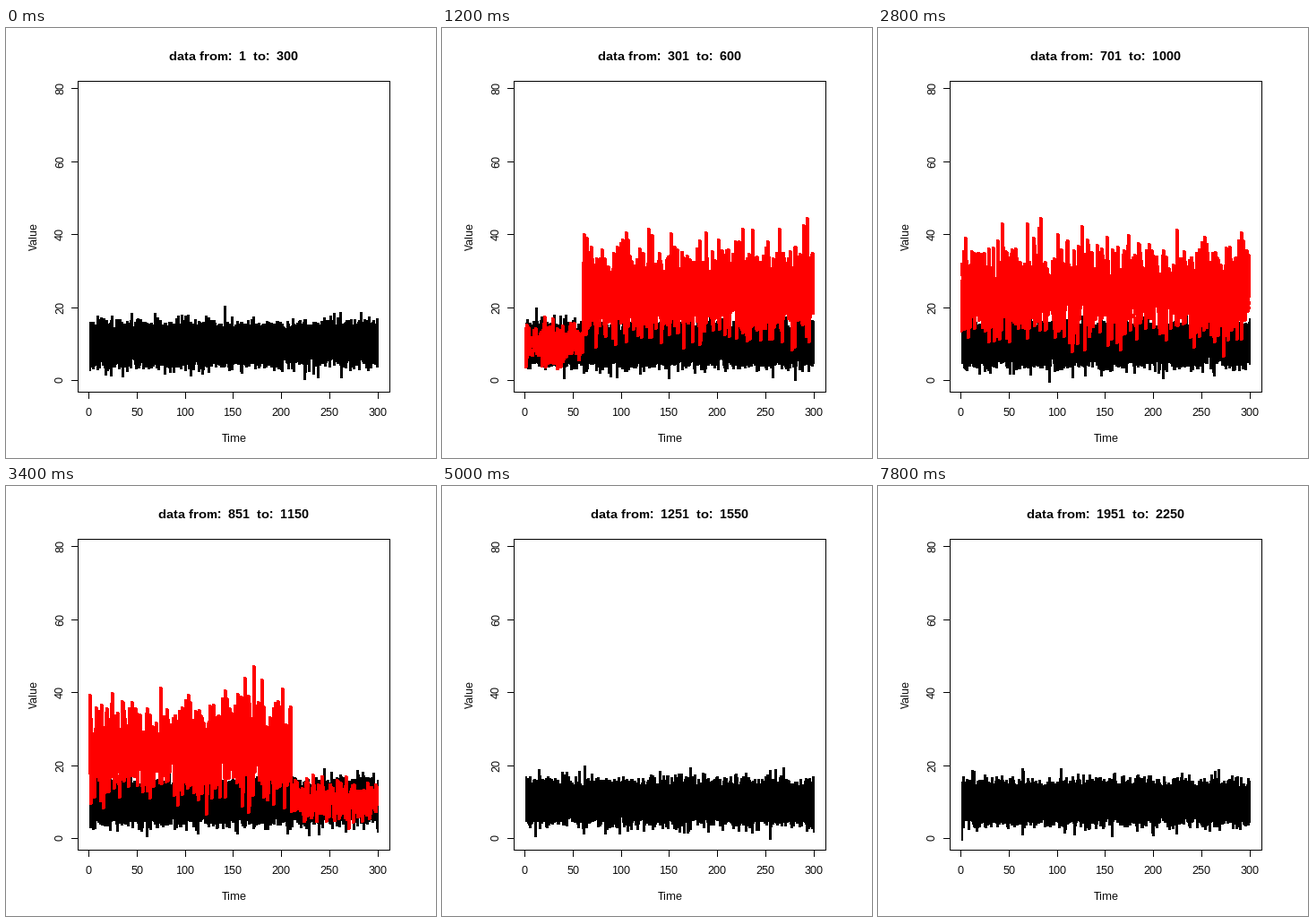
Write a matplotlib script that moves like this. It is 480x480 px and loops after 8 s.

```python
import numpy as np
import matplotlib.pyplot as plt
from matplotlib.animation import FuncAnimation
from matplotlib.collections import LineCollection

plt.rcParams.update({
    "font.family": "Liberation Sans",
    "text.hinting": "native",
    "text.hinting_factor": 1,
    "path.simplify": False,
})

SIZE, DPI = 480, 96
PX = 72 / DPI                      # one pixel in points
WINDOW, STEP, FRAMES = 300, 50, 40
SHIFT_ON, SHIFT_OFF = 361, 1060    # times between which the level is raised

# Square plot region centred between the margins, 4 % padding on each axis
SIDE = 347.52
LEFT, TOP = 80.64, 59.04
RIGHT, BOTTOM = LEFT + SIDE, TOP + SIDE
X_MIN, X_MAX = 1, WINDOW
Y_MIN, Y_MAX = 0, 79


def scale(value, low, high):
    pad = 0.04 * (high - low)
    return SIDE * (value - low + pad) / (high - low + 2 * pad)


def px(t):
    return np.floor(LEFT + scale(t, X_MIN, X_MAX))


def py(v):
    return np.floor(BOTTOM - scale(v, Y_MIN, Y_MAX))


rng = np.random.default_rng(12)
total = WINDOW + STEP * (FRAMES - 1)
times = np.arange(1, total + 1)
raised = (times >= SHIFT_ON) & (times <= SHIFT_OFF)

black = rng.normal(10, 2.5, (50, total))
red = rng.normal(np.where(raised, 24.5, 10), np.where(raised, 6.3, 2.5),
                 (5, total))

fig = plt.figure(figsize=(SIZE / DPI, SIZE / DPI), dpi=DPI, facecolor="white")
ax = fig.add_axes([0, 0, 1, 1])
ax.set_xlim(0, SIZE)
ax.set_ylim(SIZE, 0)
ax.axis("off")


def line(xs, ys):
    ax.plot(np.floor(xs) + 0.5, np.floor(ys) + 0.5, color="black", lw=PX,
            antialiased=False, snap=False, zorder=3,
            solid_capstyle="projecting", solid_joinstyle="miter")


def label(x, y, text, size=12, **kw):
    return ax.text(x, y, text, fontsize=size * PX, ha="center", va="baseline",
                   rotation_mode="anchor", **kw)


def bundle(color, width, zorder):
    lines = LineCollection([], colors=color, linewidths=width * PX,
                           antialiaseds=False, capstyle="round",
                           joinstyle="round", snap=False, zorder=zorder)
    ax.add_collection(lines, autolim=False)
    return lines


line([LEFT, RIGHT, RIGHT, LEFT, LEFT], [TOP, TOP, BOTTOM, BOTTOM, TOP])
for t in range(0, 301, 50):
    line([px(t)] * 2, [BOTTOM, BOTTOM + 7])
    label(px(t), 433, str(t))
for v in range(0, 81, 20):
    line([LEFT - 7, LEFT], [py(v)] * 2)
    label(64, py(v), str(v), rotation=90)
middle = (LEFT + RIGHT) / 2
label(middle, 462, "Time")
label(35, (TOP + BOTTOM) / 2, "Value", rotation=90)
title = label(middle, 36, "", 14, weight="bold")

black_lines = bundle("black", 1, 1)
red_lines = bundle("red", 2, 2)
xs = px(np.arange(1, WINDOW + 1))


def segments(series, first, shift=0):
    part = series[:, first - 1:first - 1 + WINDOW]
    return [np.column_stack([xs, py(row)]) + shift for row in part]


def draw(i):
    first = 1 + STEP * i
    last = first + WINDOW - 1
    title.set_text(f"data from:  {first}  to:  {last}")
    # odd widths sit on pixel centres, even widths on pixel edges
    black_lines.set_segments(segments(black, first, 0.5))
    alarm = first <= SHIFT_OFF and last >= SHIFT_ON
    red_lines.set_segments(segments(red, first) if alarm else [])
    return title, black_lines, red_lines


anim = FuncAnimation(fig, draw, frames=FRAMES, interval=200, repeat=True,
                     repeat_delay=0, blit=False)
plt.show()
```
